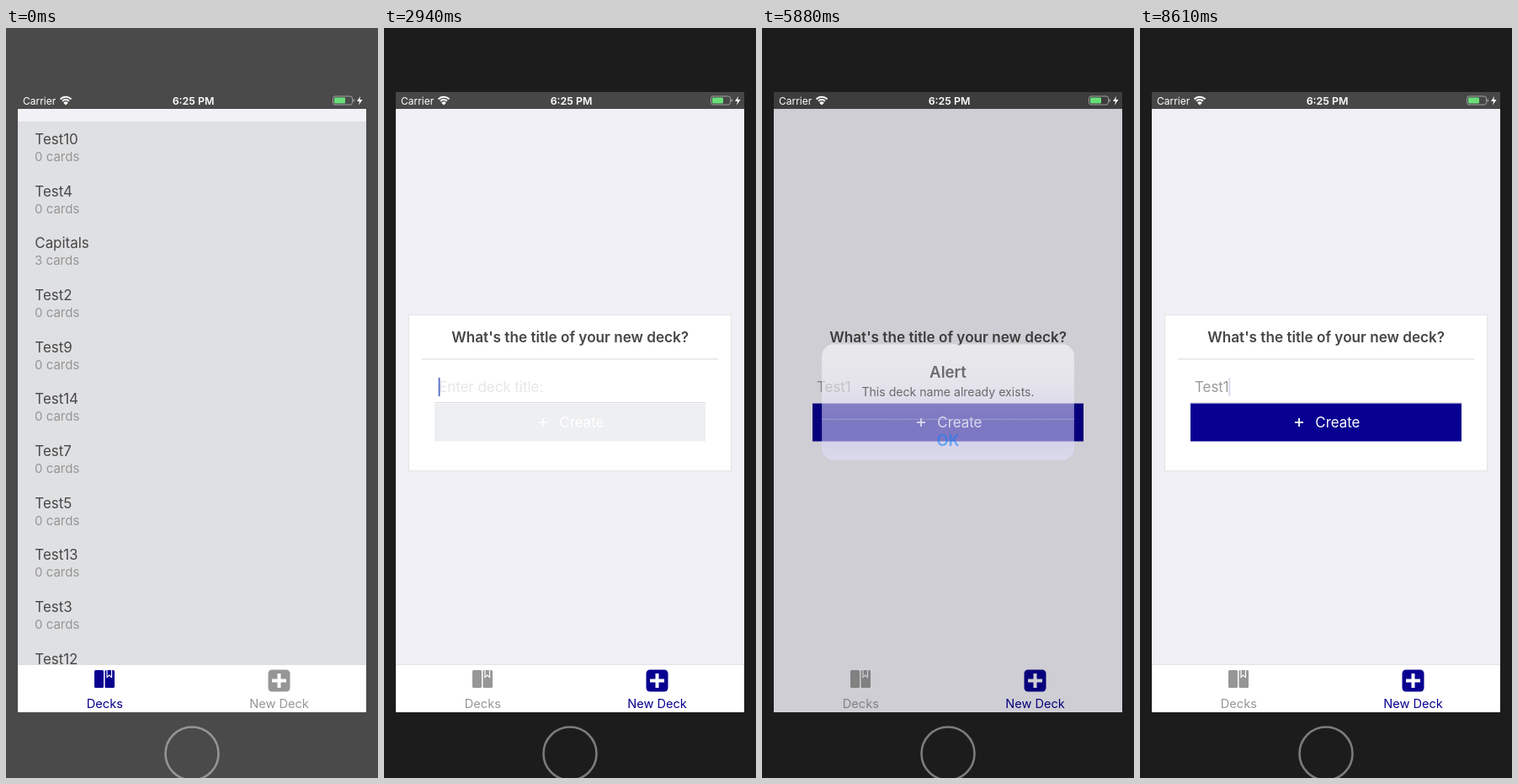
Write an HTML page with a canvas that moves like this. It is 442 px wide and 890 px high and loops after 8.68 s.

```html
<!DOCTYPE html>
<html lang="en">
<head>
<meta charset="utf-8">
<title>Deck app</title>
<style>
  html, body { margin: 0; width: 100%; height: 100%; overflow: hidden; background: #1c1c1c; }
  canvas { display: block; width: 442px; height: 890px; }
</style>
</head>
<body>
<canvas id="stage" width="442" height="890"></canvas>
<script>
const ctx = document.getElementById('stage').getContext('2d');
const LOOP = 8680, STEP = 70;
const NAVY = '#080090', GREY = '#969696', INK = '#474747', EDGE = '#e4e4e8';
const SCREEN = { x: 14, y: 76, w: 414, h: 736 };
const DECKS = ['Test10', 'Test4', 'Capitals', 'Test2', 'Test9', 'Test14',
  'Test7', 'Test5', 'Test13', 'Test3', 'Test12'];
const SWITCH_AT = 770, FOCUS_AT = 2520, ALERT_AT = 5740, DISMISS_AT = 7400, FADE = 330;
const KEYS = [['T', 3080], ['e', 3500], ['s', 3920], ['t', 4130], ['1', 5320]];

// Eased progress from 0 to 1 between two times
function ramp(t, start, end) {
  const u = Math.min(1, Math.max(0, (t - start) / (end - start)));
  return u * u * (3 - 2 * u);
}

function rect(x, y, w, h, color) {
  ctx.fillStyle = color;
  ctx.fillRect(x, y, w, h);
}

function rounded(x, y, w, h, r, fill) {
  ctx.beginPath();
  ctx.roundRect(x, y, w, h, r);
  ctx.fillStyle = fill;
  ctx.fill();
}

function text(str, x, y, size, color, { align = 'left', weight = 400 } = {}) {
  ctx.font = `${weight} ${size}px Inter, sans-serif`;
  ctx.textAlign = align;
  ctx.fillStyle = color;
  ctx.fillText(str, x, y);
}

function plus(x, y, arm, width, color) {
  rect(x - arm, y - width / 2, arm * 2, width, color);
  rect(x - width / 2, y - arm, width, arm * 2, color);
}

function polygon(points, color) {
  ctx.beginPath();
  points.forEach(([x, y]) => ctx.lineTo(x, y));
  ctx.closePath();
  ctx.fillStyle = color;
  ctx.fill();
}

function drawBody(color, ring) {
  rect(0, 0, 442, 890, color);
  ctx.beginPath();
  ctx.arc(221, 861, 31.5, 0, Math.PI * 2);
  ctx.strokeStyle = ring;
  ctx.lineWidth = 2.6;
  ctx.stroke();
}

function drawStatus() {
  text('Carrier', 20, 91, 12, '#fff');
  text('6:25 PM', 222.5, 91, 12.4, '#fff', { align: 'center', weight: 600 });

  ctx.strokeStyle = '#fff';
  ctx.lineWidth = 2;
  for (const r of [5.4, 8.8]) {
    ctx.beginPath();
    ctx.arc(71, 90.5, r, -Math.PI * 0.76, -Math.PI * 0.24);
    ctx.stroke();
  }
  ctx.beginPath();
  ctx.moveTo(71, 91.5);
  ctx.arc(71, 91.5, 4, -Math.PI * 0.75, -Math.PI * 0.25);
  ctx.fillStyle = '#fff';
  ctx.fill();

  ctx.beginPath();
  ctx.roundRect(388.5, 81, 23, 10, 2.5);
  ctx.strokeStyle = '#a0a0a0';
  ctx.lineWidth = 1;
  ctx.stroke();
  rounded(390, 82.5, 13, 7, 1, '#68de79');
  rect(412.5, 84.5, 1.5, 3, '#a0a0a0');
  polygon([[421, 81], [417, 87], [420, 87], [419, 91.5], [423.5, 85], [420.3, 85]], '#fff');
}

function drawTabs(onNew, barColor) {
  rect(14, 756, 414, 56, barColor);
  const deckColor = onNew ? GREY : NAVY, newColor = onNew ? NAVY : GREY;
  rounded(105, 762, 11, 21, 1.5, deckColor);
  rounded(117.5, 762, 11.5, 21, 1.5, deckColor);
  ctx.beginPath();
  for (const [x, y] of [[120, 762], [120, 770.5], [122.7, 768], [125.5, 770.5], [125.5, 762]]) ctx.lineTo(x, y);
  ctx.strokeStyle = barColor;
  ctx.lineWidth = 1.2;
  ctx.stroke();
  text('Decks', 117.3, 807, 14.6, deckColor, { align: 'center' });
  rounded(311.5, 761.5, 26, 26, 4.5, newColor);
  plus(324.5, 774.5, 8.5, 4, barColor);
  text('New Deck', 324.5, 807, 14.6, newColor, { align: 'center' });
}

function drawList() {
  rect(14, 96, 414, 660, '#dfe0e2');
  rect(14, 96, 414, 15, '#f2f1f6');
  DECKS.forEach((name, i) => {
    const y = 138 + i * 61.65;
    text(name, 34.3, y, 16.9, INK);
    text(name === 'Capitals' ? '3 cards' : '0 cards', 34, y + 20, 15, GREY);
  });
}

function cursorAlpha(t) {
  if (t < FOCUS_AT || (t >= ALERT_AT && t < DISMISS_AT)) return 0;
  if (t < 5000) return 1 - ramp(t, 4690, 4900);
  if (t < 8000) return ramp(t, 5180, 5390);
  return 1 - 0.75 * ramp(t, 8330, 8610);
}

function drawForm(t, bg, card) {
  rect(14, 96, 414, 660, bg);
  if (card !== bg) {
    ctx.strokeStyle = EDGE;
    ctx.lineWidth = 1;
    ctx.strokeRect(29.5, 340.5, 383, 185);
    rect(30, 341, 382, 184, card);
    rect(14, 755, 414, 1, EDGE);
    rect(45, 392.3, 352, 1.3, '#e2e2e7');
    rect(60, 444, 322, 1, '#dcdce2');
  }
  text("What's the title of your new deck?", 221.2, 373, 17.15, INK, { align: 'center', weight: 600 });

  const typed = KEYS.filter(([, at]) => t >= at).map(([key]) => key).join('');
  text(typed || 'Enter deck title:', 65, 432, 16.9, typed ? '#999' : '#e6e6e8');
  const end = 65 + (typed ? ctx.measureText(typed).width : 0);
  ctx.globalAlpha = cursorAlpha(t);
  rect(end - 0.3, 415, 1.8, 22, '#4f68c4');
  ctx.globalAlpha = 1;

  rect(60, 445.5, 322, 45, typed ? NAVY : '#eeeff1');
  plus(189, 468, 5, 1.8, '#fff');
  text('Create', 208.3, 474, 16.9, '#fff');
}

function drawAlert(opacity, scale) {
  ctx.save();
  ctx.globalAlpha = opacity;
  ctx.translate(221, 444);
  ctx.scale(scale, scale);
  ctx.translate(-221, -444);
  const glass = ctx.createLinearGradient(0, 382, 0, 506);
  glass.addColorStop(0, '#fefefe');
  glass.addColorStop(0.35, '#f6f5fd');
  glass.addColorStop(0.65, '#dcd9fc');
  glass.addColorStop(0.85, '#dad7fc');
  glass.addColorStop(1, '#e4e2fb');
  rounded(86, 382, 270, 124, 13, glass);
  rect(86, 461.8, 270, 1, '#b3b0d2');
  text('Alert', 221, 418, 16.8, '#0a0a0a', { align: 'center', weight: 600 });
  text('This deck name already exists.', 221, 438, 12.7, '#0a0a0a', { align: 'center' });
  text('OK', 221, 491, 16.6, '#157efb', { align: 'center', weight: 600 });
  ctx.restore();
}

function draw(t) {
  const onNew = t >= SWITCH_AT;
  const shown = ramp(t, ALERT_AT, ALERT_AT + FADE);
  const presence = shown - ramp(t, DISMISS_AT, DISMISS_AT + FADE);
  const fading = presence > 0 && presence < 1;
  const bg = t < FOCUS_AT ? '#eeeff1' : '#f0eff5';
  const white = fading ? bg : '#fff';

  drawBody(onNew ? '#1c1c1c' : '#4a4a4a', onNew ? '#7c7c7c' : '#949494');
  rect(SCREEN.x, SCREEN.y, SCREEN.w, 20, onNew ? '#474747' : '#4a4a4a');
  if (onNew) drawForm(t, bg, white);
  else drawList();
  drawTabs(onNew, white);

  if (presence > 0) {
    rect(SCREEN.x, SCREEN.y, SCREEN.w, SCREEN.h, `rgba(0, 0, 0, ${0.35 * presence})`);
    drawAlert(presence ** 0.62, 1.18 - 0.18 * shown);
  }
  drawStatus();
}

function tick(now) {
  const t = now % LOOP;
  draw(Math.floor(t / STEP) * STEP);
  requestAnimationFrame(tick);
}
requestAnimationFrame(tick);
</script>
</body>
</html>
```
